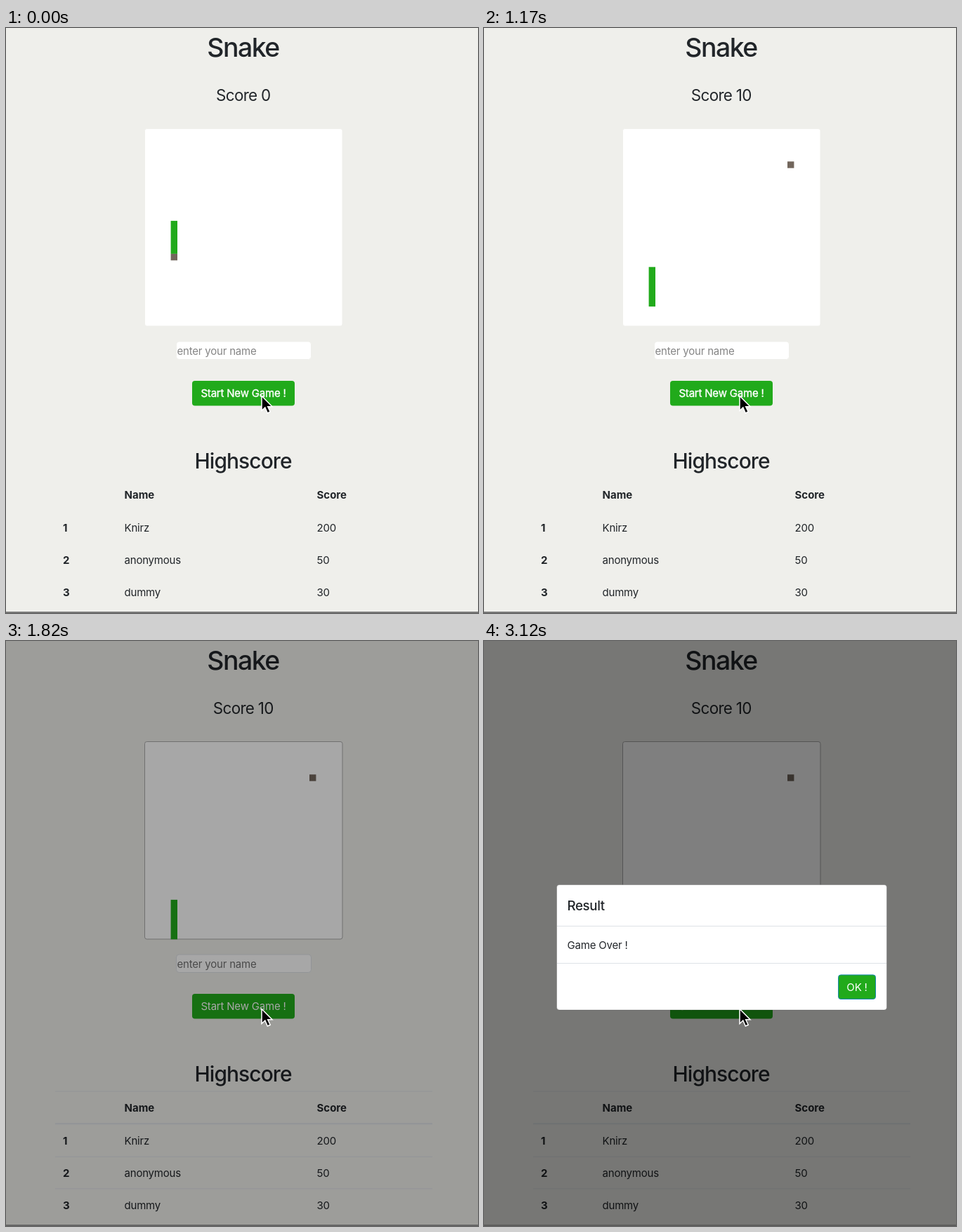
Write an HTML page that moves like this. It is 672 px wide and 834 px high and loops after 3.64 s.

```html
<!DOCTYPE html>
<html lang="en">
<head>
<meta charset="utf-8">
<title>Snake</title>
<style>
  html, body { margin: 0; width: 100%; height: 100%; overflow: hidden; background: #efefeb; }
  svg { display: block; width: 672px; height: 834px; --edge: #efefeb; --rule: #efefeb; --hint: #858585; --bold: .35px; }
  svg.over { --edge: #aaa; --rule: #dee2e6; --hint: #707070; --bold: 0; }
  text { font: 15px Inter, Roboto, sans-serif; font-optical-sizing: none; letter-spacing: -.2px; fill: #212529; }
  .mid { text-anchor: middle; }
  .b { font-weight: 700; letter-spacing: 0; }
  .h1 { font-size: 37.4px; font-weight: 500; letter-spacing: -.04em; }
  .h2 { font-size: 29.9px; font-weight: 500; letter-spacing: -.03em; }
  .h4 { font-size: 22.4px; letter-spacing: -.03em; }
  .h5 { font-size: 18.7px; font-weight: 500; letter-spacing: -.02em; }
  .btn { fill: #fff; }
  .start { stroke: #fff; stroke-width: var(--bold); }
  .hint { fill: var(--hint); }
  .green { fill: #21aa1b; }
  .board { fill: #fff; stroke: var(--edge); }
  .input { fill: #fff; stroke: var(--rule); }
  .rules { stroke: var(--rule); }
</style>
</head>
<body>
<svg id="stage" viewBox="0 0 672 834">
  <rect width="672" height="834" fill="#efefeb"/>
  <text class="mid h1" x="337.5" y="40.5">Snake</text>
  <text class="mid h4" id="score" x="337.8" y="104">Score 0</text>

  <rect class="board" x="197.5" y="143.5" width="281.5" height="281.5" rx="3"/>
  <rect class="green" id="snake" x="234.6" width="9.4"/>
  <rect id="food" width="9.4" height="9.4" fill="#72665c"/>

  <rect class="input" x="242.5" y="447" width="192" height="25.5" rx="4"/>
  <text class="hint" x="243.5" y="466">enter your name</text>
  <rect class="green" x="265" y="503" width="146" height="35.5" rx="4"/>
  <text class="mid btn start" x="338" y="526.3">Start New Game !</text>

  <text class="mid h2" x="337.5" y="628">Highscore</text>
  <g class="rules">
    <path d="M70 642H607M70 735.3H607M70 780.8H607"/>
    <path d="M70 688.3H607" stroke-width="2"/>
  </g>
  <g id="table"></g>

  <rect id="shade" width="672" height="834"/>
  <path d="M0 833H672" stroke="#555" stroke-width="1.5"/>

  <g id="modal">
    <rect x="103.5" y="347.5" width="470" height="178.5" rx="4" fill="#fff" stroke="#000" stroke-opacity=".2"/>
    <path d="M104 406.5H573M104 459.5H573" stroke="#dee2e6"/>
    <text class="h5" x="118.5" y="384">Result</text>
    <text x="118.5" y="439">Game Over !</text>
    <rect class="green" x="504.5" y="476" width="53" height="34.5" rx="3.5" stroke="#1686b0"/>
    <text class="mid btn" x="531" y="498.8">OK !</text>
  </g>

  <path d="M364 524.5V545.5L368.8 541 372.3 549 376.2 547.3 372.7 539.8H379Z" stroke="#fff" stroke-width="1.5"/>
</svg>
<script>
const STEP = 130, STEPS = 28, CELL = 9.4, LEFT = 197, TOP = 143.3;
const OVER = 13; // step at which the snake hits the wall
const $ = id => document.getElementById(id);
const clamp = v => Math.max(0, Math.min(1, v));
const set = (el, attrs) => Object.entries(attrs).forEach(([k, v]) => el.setAttribute(k, v));

const rows = [['', 'Name', 'Score'], ['1', 'Knirz', '200'], ['2', 'anonymous', '50'], ['3', 'dummy', '30']];
const baselines = [671, 717.7, 763.5, 809.5];
$('table').innerHTML = rows.map((row, r) => row.map((cell, c) =>
  `<text class="${r && c ? '' : 'b'}" x="${[81, 168.5, 442.5][c]}" y="${baselines[r]}">${cell}</text>`
).join('')).join('');

function draw(step) {
  const head = Math.min(29, 18 + Math.floor(.3 + step * .867));
  const eaten = head > 18;
  const length = eaten ? 6 : 5;
  set($('snake'), { y: TOP + (head - length + 1) * CELL, height: length * CELL });
  set($('food'), { x: LEFT + (eaten ? 25 : 4) * CELL, y: TOP + (eaten ? 5 : 19) * CELL });
  $('score').textContent = 'Score ' + (eaten ? 10 : 0);

  $('stage').classList.toggle('over', step >= OVER);
  const since = step - OVER;
  set($('shade'), { opacity: since < 0 ? 0 : Math.min(.5, .125 + since * .22) });

  // The dialog slides down while fading in, twice as fast
  const slide = since < 2 ? 0 : clamp(.3425 + (since - 2) * .22);
  set($('modal'), {
    opacity: clamp(slide * 2),
    transform: `translate(0 ${-50 * (1 - Math.sin(slide * Math.PI / 2))})`
  });
}

function tick() {
  draw(Math.floor(performance.now() / STEP) % STEPS);
  requestAnimationFrame(tick);
}
tick();
</script>
</body>
</html>
```
